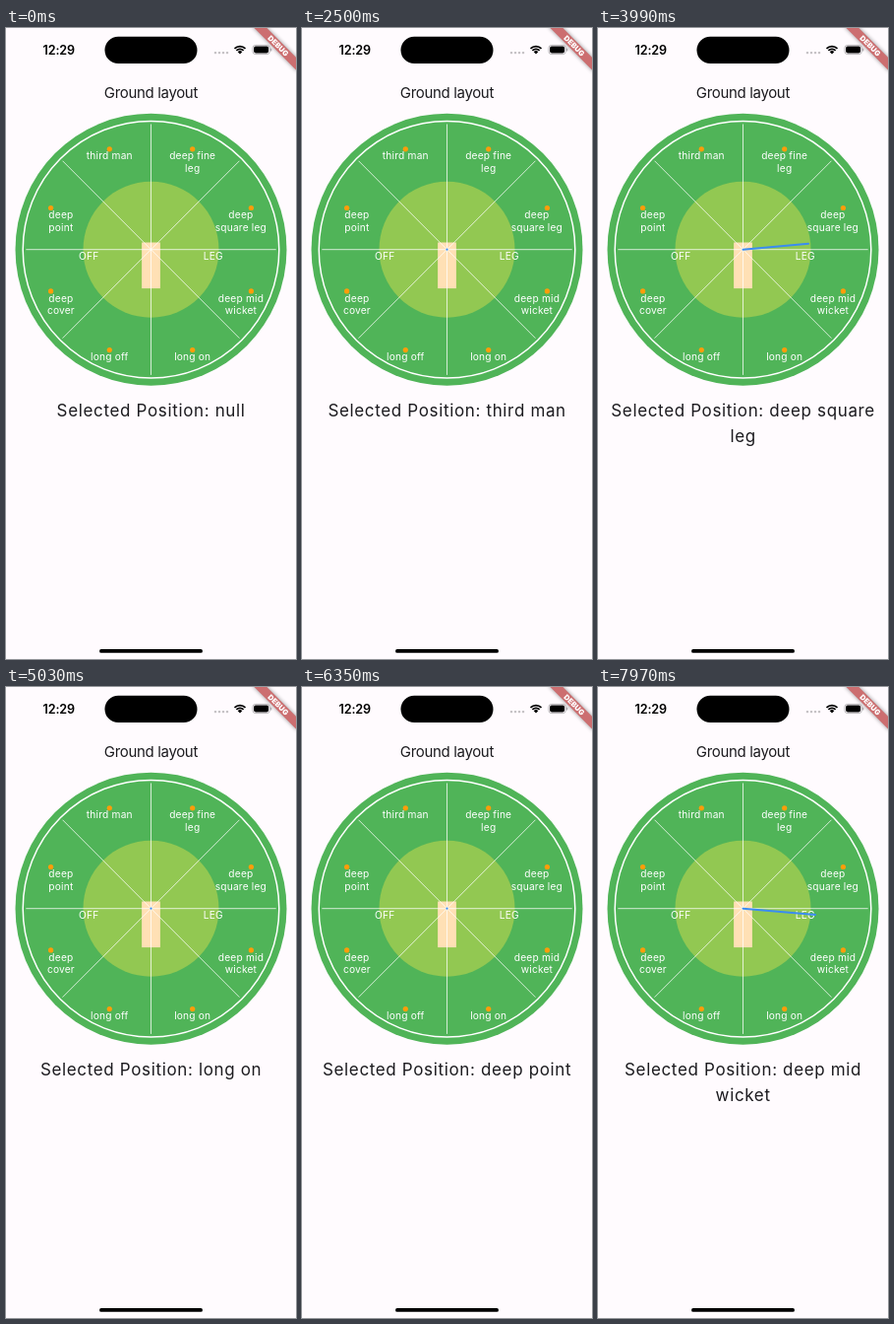
Animation, 295 px wide and 640 px high, one loop 8.9 s. Source, as an HTML page with a canvas:

```html
<!DOCTYPE html>
<html lang="en">
<head>
<meta charset="utf-8">
<title>Ground layout</title>
<style>
  html, body { margin: 0; width: 100%; height: 100%; overflow: hidden; background: #fffbfe; }
  canvas { display: block; width: 295px; height: 640px; }
</style>
</head>
<body>
<canvas id="stage"></canvas>
<script>
const W = 295, H = 640, LOOP = 8900;
const CX = 147.5, CY = 224.7;
const FONT = 'Inter, "Open Sans", sans-serif';
const canvas = document.getElementById('stage');
const ctx = canvas.getContext('2d');
const dpr = window.devicePixelRatio || 1;
canvas.width = W * dpr;
canvas.height = H * dpr;

// Clockwise from the top right sector; dx shifts the label off its marker.
const fielders = [
  { label: 'deep fine\nleg', dx: 0 },
  { label: 'deep\nsquare leg', dx: -10.5 },
  { label: 'deep mid\nwicket', dx: -10.5 },
  { label: 'long on', dx: 0 },
  { label: 'long off', dx: 0 },
  { label: 'deep\ncover', dx: 10.3 },
  { label: 'deep\npoint', dx: 10.3 },
  { label: 'third man', dx: 0 }
];

// Each tap: start, end (ms), number of steps, text, tip of the shot.
const taps = [
  [790, 1000, 3, 'long off', 120, 284],
  [1570, 1800, 3, 'deep point', 82, 203],
  [2500, 2820, 4, 'third man', 121, 169],
  [3190, 3510, 4, 'deep fine leg', 172, 168],
  [3760, 3990, 3, 'deep square\nleg', 214, 218.8],
  [4530, 4760, 3, 'long off', 121, 284],
  [5030, 5340, 4, 'long on', 172, 284],
  [5740, 5970, 3, 'third man', 122, 177],
  [6350, 6670, 4, 'deep point', 80, 208],
  [7080, 7290, 3, 'deep cover', 80, 245],
  [7660, 7970, 4, 'deep mid\nwicket', 221, 231]
].map(([start, end, steps, text, x, y]) => ({ start, end, steps, text, x, y }));

function write(str, x, y, size, o = {}) {
  ctx.font = `${o.weight || 400} ${size}px ${FONT}`;
  ctx.letterSpacing = (o.spacing || 0) + 'px';
  ctx.textAlign = 'center';
  ctx.textBaseline = o.base || 'alphabetic';
  ctx.fillStyle = o.color || '#1c1b1f';
  str.split('\n').forEach((row, i) => ctx.fillText(row, x, y + i * (o.leading || 0)));
}

function disc(x, y, r, color) {
  ctx.beginPath();
  ctx.arc(x, y, r, 0, Math.PI * 2);
  ctx.fillStyle = color;
  ctx.fill();
}

function pill(x, y, w, h, r, color) {
  ctx.beginPath();
  ctx.roundRect(x, y, w, h, r);
  ctx.fillStyle = color;
  ctx.fill();
}

function line(x1, y1, x2, y2, width, color, cap = 'butt') {
  ctx.beginPath();
  ctx.moveTo(x1, y1);
  ctx.lineTo(x2, y2);
  ctx.lineWidth = width;
  ctx.lineCap = cap;
  ctx.strokeStyle = color;
  ctx.stroke();
}

function drawWifi() {
  const x = 238, y = 26.4, a = Math.PI / 4;
  ctx.strokeStyle = '#000';
  ctx.lineWidth = 1.7;
  ctx.lineCap = 'butt';
  for (const r of [5.1, 7.8]) {
    ctx.beginPath();
    ctx.arc(x, y, r, -Math.PI / 2 - a, -Math.PI / 2 + a);
    ctx.stroke();
  }
  ctx.beginPath();
  ctx.moveTo(x, y);
  ctx.arc(x, y, 3.2, -Math.PI / 2 - a, -Math.PI / 2 + a);
  ctx.fillStyle = '#000';
  ctx.fill();
}

function drawBattery() {
  ctx.beginPath();
  ctx.roundRect(250.9, 17.4, 17.4, 9.2, 2.9);
  ctx.lineWidth = 0.8;
  ctx.strokeStyle = '#a5a3a6';
  ctx.stroke();
  pill(252.1, 18.6, 15, 6.8, 1.8, '#000');
  pill(269.2, 20.5, 1.1, 3, 0.6, '#a5a3a6');
}

function drawBanner() {
  ctx.save();
  ctx.translate(W, 0);
  ctx.rotate(Math.PI / 4);
  ctx.shadowColor = 'rgba(0,0,0,.45)';
  ctx.shadowBlur = 4.5 * dpr;
  ctx.fillStyle = '#cc6e70';
  ctx.fillRect(-32, 21, 64, 9);
  ctx.shadowColor = 'transparent';
  write('DEBUG', 0, 28.2, 7.5, { weight: 900, color: '#fff' });
  ctx.restore();
}

function drawChrome() {
  write('12:29', 53.7, 26.6, 12.6, { weight: 600, color: '#000', spacing: -0.1 });
  pill(100.5, 8.7, 94, 27.4, 13.7, '#000');
  for (let i = 0; i < 4; i++) pill(211.8 + i * 4, 23.9, 2.4, 2.4, 0.8, '#c4c1c4');
  drawWifi();
  drawBattery();
  write('Ground layout', 147.4, 71.2, 15, { spacing: -0.33 });
  pill(95, 630, 105, 3.8, 1.9, '#000');
  drawBanner();
}

function drawGround() {
  disc(CX, CY, 138, '#50b458');
  disc(CX, CY, 69, '#92c852');
  ctx.beginPath();
  ctx.arc(CX, CY, 130.3, 0, Math.PI * 2);
  ctx.lineWidth = 1.5;
  ctx.strokeStyle = '#fff';
  ctx.stroke();
  ctx.fillStyle = '#ffe0b5';
  ctx.fillRect(138.1, 217.5, 18.8, 46.6);
  for (let i = 0; i < 4; i++) {
    const a = i * Math.PI / 4, dx = 127.2 * Math.cos(a), dy = 127.2 * Math.sin(a);
    line(CX - dx, CY - dy, CX + dx, CY + dy, 0.75, '#fff');
  }
  const label = { color: '#fff', spacing: 0.18, leading: 12.6 };
  fielders.forEach((f, i) => {
    const a = (i + 0.5) * Math.PI / 4;
    const x = CX + 110.3 * Math.sin(a), y = CY - 110.3 * Math.cos(a);
    disc(x, y, 2.6, '#ff9d0a');
    write(f.label, x + f.dx, y + 10.6, 10.2, label);
  });
  write('OFF', 84.2, 235.2, 10.2, label);
  write('LEG', 210.8, 235.2, 10.2, label);
}

// Progress advances in discrete steps between start and end.
function progress(tap, t) {
  const n = tap.steps - 1;
  const k = Math.floor((t - tap.start) / (tap.end - tap.start) * n + 0.02);
  return Math.min(k, n) / n;
}

function drawShot(tap, t) {
  const p = progress(tap, t);
  const x = CX + (tap.x - CX) * p, y = CY + (tap.y - CY) * p;
  if (p) line(CX, CY, x, y, 2, '#3a8cf2', 'round');
  else disc(CX, CY, 1.1, '#3a8cf2');
}

function draw(t) {
  ctx.setTransform(dpr, 0, 0, dpr, 0, 0);
  ctx.fillStyle = '#fffbfe';
  ctx.fillRect(0, 0, W, H);
  drawChrome();
  drawGround();
  const tap = taps.filter(s => s.start <= t).pop();
  if (tap) drawShot(tap, t);
  write('Selected Position: ' + (tap ? tap.text : 'null'), 147.6, 394.2, 17,
    { spacing: 0.65, leading: 25.6 });
}

const begin = performance.now();
function tick() {
  draw((performance.now() - begin) % LOOP);
  requestAnimationFrame(tick);
}
tick();
</script>
</body>
</html>
```
